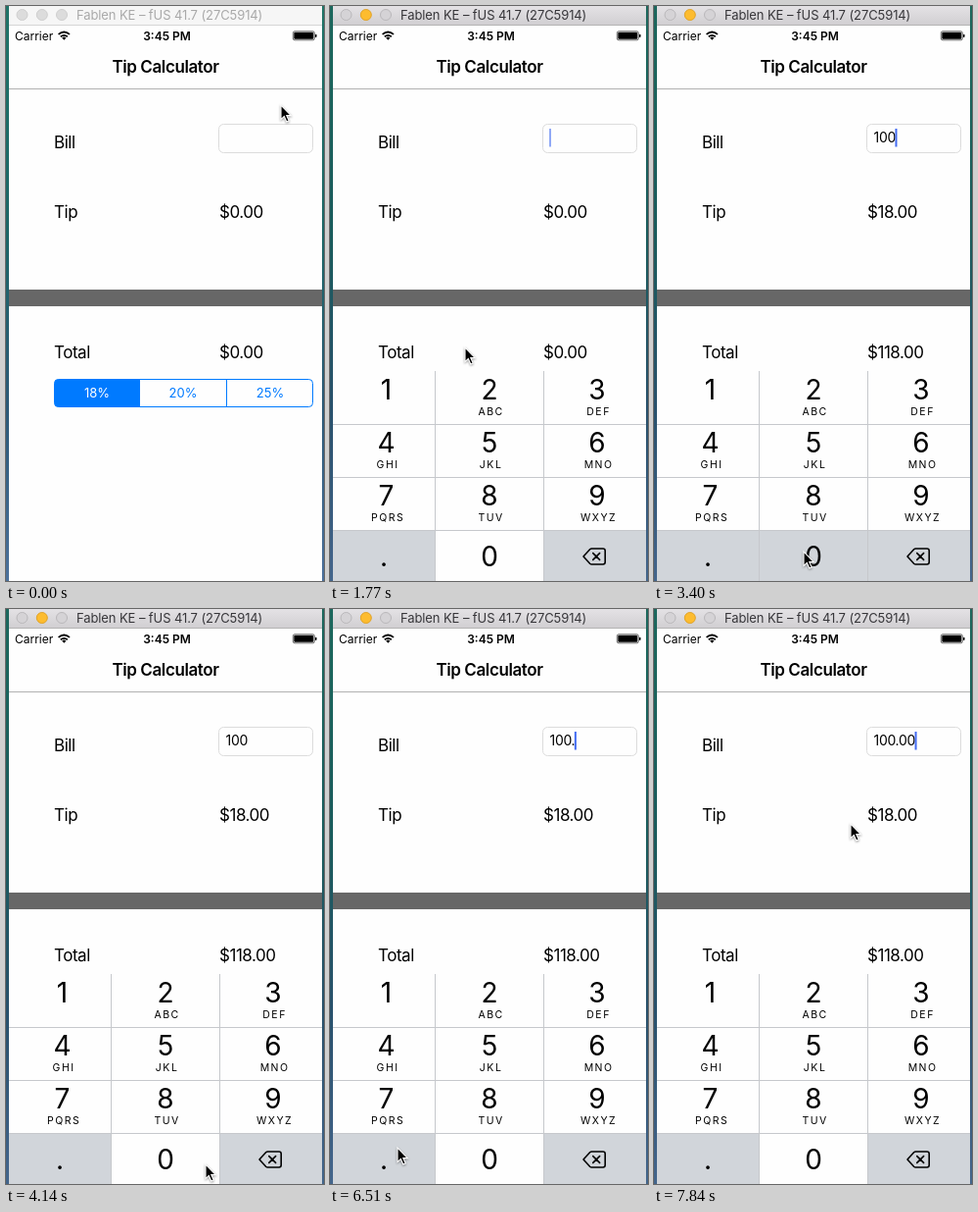
Write an HTML page that moves like this. It is 325x586 px and loops after 7.99 s.

```html
<!DOCTYPE html>
<html lang="en">
<head>
<meta charset="utf-8">
<title>Tip Calculator</title>
<style>
  html, body { margin: 0; width: 100%; height: 100%; overflow: hidden; }
  svg { display: block; width: 100vw; height: 100vh; font-family: Inter, sans-serif; }
  .mid { text-anchor: middle; }
  .label { font-size: 17px; letter-spacing: -.47px; }
  .digit { font-size: 28px; }
  .letters { font-size: 10.5px; letter-spacing: 1.5px; }
  .seg { font-size: 13px; fill: #007aff; }
  .light { fill: #dcdcdc; stroke: #cfcfcf; }
  .title { fill: #a9a9a9; font-size: 13px; letter-spacing: -.1px; }
  .bar { fill: #f6f6f6; }
  .edge { fill: #d6d6d6; }
  .active .bar { fill: url(#chrome); }
  .active .edge { fill: #b4b4b4; }
  .active .title { fill: #37363a; }
  .active .light { fill: #d5d3d6; stroke: #bab8bb; }
  .active .amber { fill: #fdbc2f; stroke: #e0a32a; }
  .shade { fill: #000; opacity: 0; }
  .active .shade { opacity: .1; }
</style>
</head>
<body>
<svg id="stage" viewBox="0 0 325 586">
  <defs>
    <linearGradient id="desk" x2="0" y2="1">
      <stop offset="0" stop-color="#1f7468"/>
      <stop offset=".4" stop-color="#1d6667"/>
      <stop offset=".7" stop-color="#2d5a78"/>
      <stop offset="1" stop-color="#4c719c"/>
    </linearGradient>
    <linearGradient id="chrome" x2="0" y2="1">
      <stop offset="0" stop-color="#e4e2e5"/>
      <stop offset="1" stop-color="#d0ced1"/>
    </linearGradient>
    <clipPath id="window"><rect x="3" width="320" height="586"/></clipPath>
  </defs>
  <rect width="325" height="586" fill="url(#desk)"/>
  <rect class="shade" width="325" height="586"/>

  <g clip-path="url(#window)">
    <rect x="3" width="320" height="586" fill="#fefefe"/>
    <rect class="bar" x="3" width="320" height="20"/>
    <rect class="edge" x="3" y="19" width="320" height="1"/>
    <circle class="light" cx="16.5" cy="9" r="5.5"/>
    <circle class="light amber" cx="36.8" cy="9" r="5.5"/>
    <circle class="light" cx="57" cy="9" r="5.5"/>
    <text class="title" x="72" y="14">Fablen KE – fUS 41.7 (27C5914)</text>

    <text x="9" y="34.5" font-size="12">Carrier</text>
    <g fill="none" stroke="#000" stroke-width="1.8">
      <path d="M53.6 28.9Q59.3 24 65 28.9M55.8 31.3Q59.3 28.4 62.8 31.3"/>
      <path d="M57.2 32.4Q59.3 30.8 61.4 32.4L59.3 34.8Z" fill="#000" stroke="none"/>
    </g>
    <text class="mid" x="164.5" y="34.5" font-size="12" font-weight="600">3:45 PM</text>
    <rect x="293.3" y="25.8" width="22" height="9" rx="1.8" fill="none" stroke="#000" stroke-width=".6"/>
    <rect x="294.3" y="26.8" width="20" height="7" rx="1"/>
    <rect x="316" y="28.7" width="1.5" height="3.2" rx=".7"/>
    <text class="mid" x="163" y="68" font-size="17" font-weight="600" letter-spacing="-.4">Tip Calculator</text>
    <rect x="3" y="84" width="320" height="1" fill="#b2b2b2"/>

    <g class="label">
      <text x="49" y="145">Bill</text>
      <text x="49" y="216">Tip</text>
      <text x="49" y="359">Total</text>
      <text id="tip" x="218" y="216"></text>
      <text id="total" x="218" y="359"></text>
    </g>
    <rect x="217.5" y="120.5" width="96" height="29" rx="5" fill="#fefefe" stroke="#dcdcdc"/>
    <text id="bill" x="224.5" y="139" font-size="14" letter-spacing="-.3"></text>
    <rect id="caret" y="125" width="2" height="18.5" fill="#426bf2"/>
    <rect x="3" y="289" width="320" height="17" fill="#676767"/>

    <path d="M137 380.5H53.5a4 4 0 0 0-4 4v20a4 4 0 0 0 4 4H137Z" fill="#007aff"/>
    <rect x="49.5" y="380.5" width="264" height="28" rx="4" fill="none" stroke="#007aff"/>
    <path d="M136.5 380V409M225.5 380V409" stroke="#007aff"/>
    <text class="seg mid" x="93" y="399" style="fill:#fff">18%</text>
    <text class="seg mid" x="181" y="399">20%</text>
    <text class="seg mid" x="270" y="399">25%</text>

    <g id="pad"></g>
  </g>

  <path id="arrow" d="M0 0V14.6L3.3 11.5L5.8 17L8.2 16L5.8 10.6H10.3Z" stroke="#fff" stroke-width="1.1"
        style="filter:drop-shadow(0 1px 1px #0006)"/>
</svg>
<script>
const $ = id => document.getElementById(id);
const LOOP = 7990, TICK = 147.96, FOCUS = 5, RATE = .18;
const WHITE = '#fefefe', GREY = '#d1d5da';

// pointer stops: tick, x, y
const path = [
  [0, 281, 101], [1, 282, 95], [2, 262, 114], [3, 247, 130], [4, 247, 130],
  [5, 251, 131], [6, 251, 131], [10, 138, 348], [12, 138, 348], [14, 58, 390],
  [16, 58, 390], [19, 148, 546], [20, 153, 556], [24, 153, 556], [28, 204, 566],
  [31, 246, 565], [35, 168, 560], [38, 69, 549], [45, 69, 549], [47, 155, 556],
  [50, 155, 556], [53, 201, 219]
];
// key presses: tick, key
const presses = [[15, '1'], [21, '0'], [23, '0'], [43, '.'], [47, '0'], [50, '0']];

const keys = {};
function buildPad() {
  const names = ['1', '2', '3', '4', '5', '6', '7', '8', '9', '.', '0', 'del'];
  const letters = ['', 'ABC', 'DEF', 'GHI', 'JKL', 'MNO', 'PQRS', 'TUV', 'WXYZ'];
  const left = [3, 108, 219], width = [105, 111, 104], mid = [57.5, 163, 273];
  let faces = '', glyphs = '';
  names.forEach((name, i) => {
    const col = i % 3, y = 372 + 54 * Math.floor(i / 3);
    const base = i < 9 ? y + 29 : y + 37;
    faces += `<rect x="${left[col]}" y="${y}" width="${width[col]}" height="54"/>`;
    if (name !== 'del')
      glyphs += `<text class="digit mid" x="${name === '.' ? 55 : mid[col]}" y="${base}">${name}</text>`;
    if (letters[i])
      glyphs += `<text class="letters mid" x="${mid[col] + 1.6}" y="${y + 45}">${letters[i]}</text>`;
  });
  $('pad').innerHTML = `${faces}
    <path d="M107.5 372V588M218.5 372V588M3 426.5H323M3 480.5H323M3 534.5H323" stroke="#c6c8cc"/>${glyphs}
    <path d="M259 561L265.6 553.8Q266.4 553 267.5 553H279Q281.2 553 281.2 555.2V566.8Q281.2 569 279 569H267.5Q266.4 569 265.6 568.2ZM268.8 557.6L275.6 564.4M275.6 557.6L268.8 564.4"
      fill="none" stroke="#000" stroke-width="1.6" stroke-linejoin="round" stroke-linecap="round"/>`;
  const rects = $('pad').querySelectorAll('rect');
  names.forEach((name, i) => keys[name] = {
    face: rects[i],
    rest: name === '.' || name === 'del' ? GREY : WHITE
  });
}

function pointer(tick) {
  const i = path.findIndex(p => p[0] > tick);
  if (i < 0) return path[path.length - 1].slice(1);
  const [t0, x0, y0] = path[i - 1], [t1, x1, y1] = path[i];
  const u = (tick - t0) / (t1 - t0), e = u * u * (3 - 2 * u);
  return [x0 + (x1 - x0) * e, y0 + (y1 - y0) * e];
}

function caretAlpha(ms) {
  const p = ms % 1100;
  if (p < 500) return 1;
  if (p < 650) return (650 - p) / 150;
  return p < 950 ? 0 : (p - 950) / 150;
}

const money = v => '$' + v.toFixed(2);

function draw(tick) {
  const focused = tick >= FOCUS;
  const done = presses.filter(p => p[0] <= tick);
  const bill = done.map(p => p[1]).join(''), amount = +bill || 0;
  const last = done.length ? done[done.length - 1] : [FOCUS];

  $('stage').classList.toggle('active', focused);
  $('bill').textContent = bill;
  $('tip').textContent = money(amount * RATE);
  $('total').textContent = money(amount * (1 + RATE));
  $('caret').setAttribute('x', 224 + (bill ? $('bill').getComputedTextLength() : 0));
  $('caret').setAttribute('opacity', focused ? caretAlpha((tick - last[0]) * TICK) : 0);

  const drop = focused ? Math.round(216 * Math.exp(-1.737 * (tick - FOCUS))) : 216;
  $('pad').setAttribute('transform', `translate(0 ${drop})`);
  for (const name in keys) {
    const { face, rest } = keys[name];
    const down = last[0] === tick && last[1] === name;
    face.setAttribute('fill', down ? (rest === GREY ? WHITE : GREY) : rest);
  }
  $('arrow').setAttribute('transform', `translate(${pointer(tick).map(Math.round)})`);
}

buildPad();
const start = performance.now();
let shown = -1;
function frame() {
  const ms = Math.max(0, performance.now() - start) % LOOP;
  // the screen refreshes in even ticks, rounded down to 10 ms
  const tick = Math.min(53, Math.floor((Math.floor(ms / 10) * 10 + 9.99) / TICK));
  if (tick !== shown) draw(shown = tick);
  requestAnimationFrame(frame);
}
frame();
</script>
</body>
</html>
```
